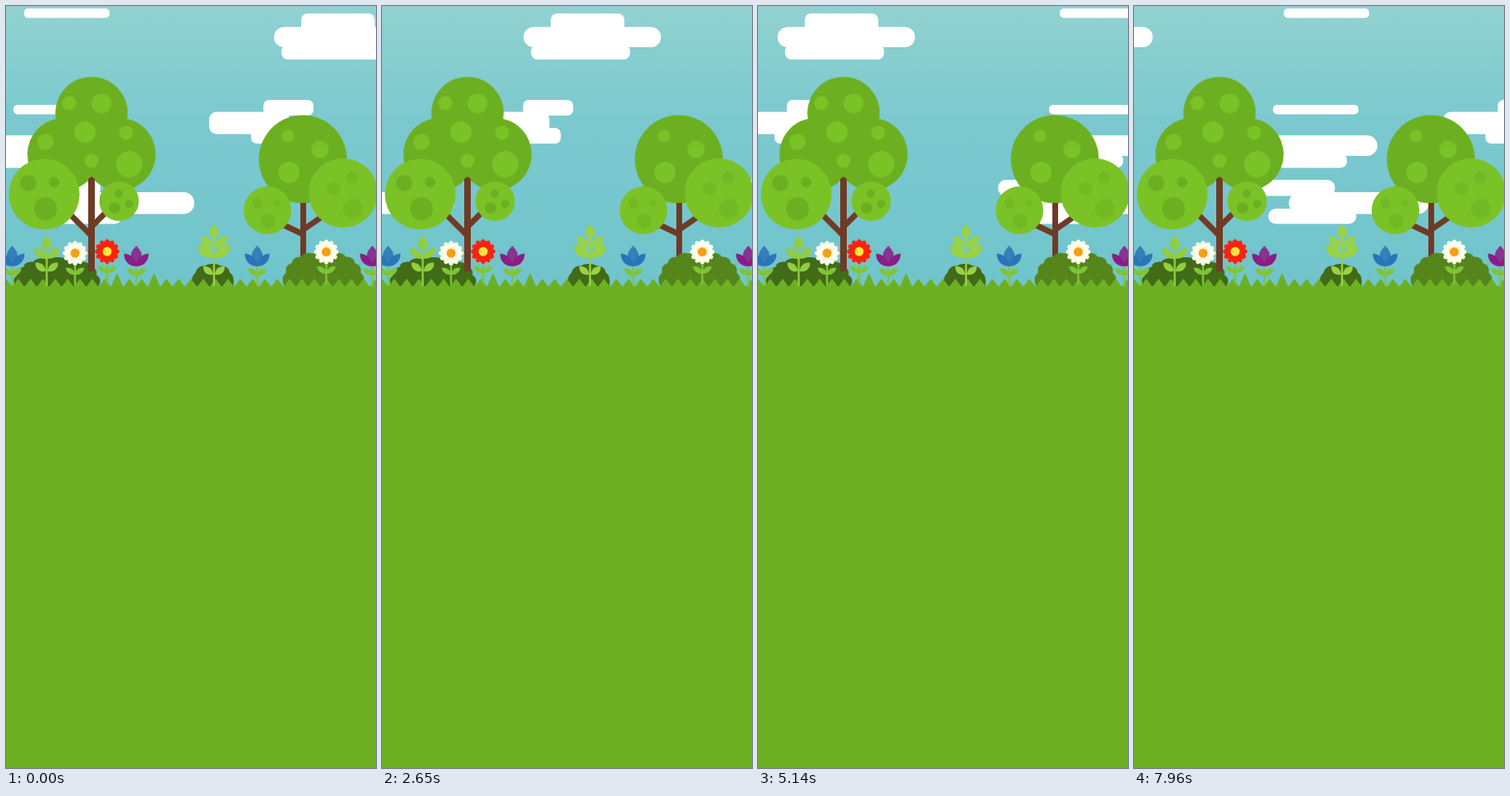
An HTML page that plays this animation: 450x925 px, repeating every 7990 ms.

```html
<!DOCTYPE html>
<html lang="en">
<head>
<meta charset="utf-8">
<title>Meadow with drifting clouds</title>
<style>
  html, body { margin: 0; width: 100%; height: 100%; overflow: hidden; background: #6cb021; }
  svg { display: block; width: 100%; height: 100%; }
</style>
</head>
<body>
<svg viewBox="0 0 450 925">
  <defs>
    <linearGradient id="sky" x1="0" y1="0" x2="0" y2="1">
      <stop offset="0" stop-color="#91d2d0"/>
      <stop offset=".4" stop-color="#7bc9cf"/>
      <stop offset="1" stop-color="#70c4cb"/>
    </linearGradient>

    <g id="streaks">
      <rect x="22" y="3" width="104" height="11.5" rx="5"/>
      <rect x="9" y="120" width="104" height="11.5" rx="5"/>
      <rect x="-31" y="157" width="167" height="25" rx="12.5"/>
      <rect x="-21" y="179" width="120" height="17.5" rx="8"/>
    </g>
    <g id="bigCloud">
      <rect x="359" y="9" width="89.5" height="26" rx="8"/>
      <rect x="326" y="25.5" width="167" height="24.5" rx="12"/>
      <rect x="335" y="47" width="120.5" height="18" rx="8"/>
    </g>
    <g id="lowClouds">
      <rect x="313" y="114" width="61" height="19" rx="7"/>
      <rect x="247" y="128.5" width="98" height="27" rx="9"/>
      <rect x="298" y="148" width="61" height="19" rx="7"/>
      <rect x="8" y="211" width="107" height="19.5" rx="9"/>
      <rect x="59" y="226" width="170" height="26.5" rx="13"/>
      <rect x="34" y="246" width="107" height="18.5" rx="9"/>
    </g>

    <path id="leaf" d="M0 0C1-8 6-12 14-12C15-4 9 2 0 0Z"/>
    <g id="sprout" fill="#80c436">
      <path d="M-1.2 0h2.4v24h-2.4z"/>
      <path d="M0 11C-1 4-6 2-11.5 3C-10 9-5 12 0 11ZM0 11C1 4 6 2 11.5 3C10 9 5 12 0 11Z"/>
    </g>
    <g id="tulip">
      <use href="#sprout" y="316"/>
      <path d="M0 291C5 296 8 301 6 307L0 314L-6 307C-8 301-5 296 0 291Z" fill-opacity=".86"/>
      <path d="M-15 300.500C-7 301-1 307 0 313C1 307 7 301 15 300.500C15 310 9 316 0 316C-9 316-15 310-15 300.500Z"/>
    </g>
  </defs>

  <rect width="450" height="345" fill="url(#sky)"/>

  <g fill="#fff">
    <g id="nearLayer"><use href="#streaks"/><use href="#bigCloud"/></g>
    <g id="fastLayer"><use href="#streaks"/></g>
    <g id="slowLayer"><use href="#lowClouds"/><use href="#lowClouds" x="562"/></g>
  </g>

  <g id="scene"></g>
</svg>

<script>
const GREEN = '#6cb021', LIGHT = '#7bc227', BARK = '#6f3b26', DARK = '#416b17';
const scene = document.getElementById('scene');
const add = markup => scene.insertAdjacentHTML('beforeend', markup);

const circles = (fill, ...list) =>
  add(list.map(([x, y, r]) => `<circle cx="${x}" cy="${y}" r="${r}" fill="${fill}"/>`).join(''));

const wood = (path, width) =>
  add(`<path d="${path}" fill="none" stroke="${BARK}" stroke-width="${width}"/>`);

// Half a rounded box with a scalloped rim.
function bush(x, rx, ry, lumps, fill) {
  const points = [];
  for (let i = 0; i <= 120; i++) {
    const a = Math.PI * i / 120, c = Math.cos(a), s = Math.sin(a);
    const k = 0.95 + 0.05 * Math.abs(Math.sin(lumps * a));
    points.push([
      x + rx * k * Math.sign(c) * Math.abs(c) ** 0.8,
      341 - ry * k * s ** 0.8
    ].map(v => v.toFixed(1)));
  }
  add(`<path d="M${points.join('L')}Z" fill="${fill}"/>`);
}

function daisy(x, y, petal, heart, heartRadius) {
  add(`<use href="#sprout" x="${x}" y="${y + 15}"/>`);
  let petals = '';
  for (let a = 0; a < 360; a += 30)
    petals += `<ellipse cy="-9.500" rx="3.500" ry="5.500" transform="rotate(${a})"/>`;
  add(`<g transform="translate(${x} ${y})" fill="${petal}"><circle r="9.500"/>${petals}
    <circle r="${heartRadius}" fill="${heart}"/></g>`);
}

function tulip(x, fill) {
  add(`<use href="#tulip" x="${x}" fill="${fill}"/>`);
}

function plant(x, top, fill, pairs) {
  const leaves = pairs.map(([y, size]) => [1, -1].map(side =>
    `<use href="#leaf" transform="translate(${side} ${y}) scale(${side * size} ${size})"/>`).join('')).join('');
  add(`<g fill="${fill}" transform="translate(${x} ${top})">
    <path d="M0 0C4 4 6 8 6 11C5 15 2 16 0 17C-2 16-5 15-6 11C-6 8-4 4 0 0Z"/>
    <path d="M-1.200 14h2.400V${340 - top}h-2.400z"/>${leaves}</g>`);
}

function grass() {
  let d = 'M0 345V332';
  for (let x = 0; x <= 450; x += 15)
    d += `L${x} ${x === 135 || x === 180 ? 324 : 331}L${x + 7.5} 341`;
  add(`<path d="${d}V345Z" fill="${GREEN}"/><rect y="340" width="450" height="585" fill="${GREEN}"/>`);
}

// Left tree
bush(62, 53, 36, 9, DARK);
circles(GREEN, [104, 130, 44], [70, 180, 44], [138, 180, 44], [104, 170, 30]);
circles(LIGHT, [77, 118, 8.5], [116, 118.5, 12], [96, 153, 13], [48, 165, 10],
  [146, 154, 8.5], [104, 188, 8.5], [150, 192, 16]);
wood('M76 251L104 279M124 248L104 268', 7);
add(`<path d="M100 322V210L104 207L108 210V322Z" fill="${BARK}"/>`);
circles(LIGHT, [46.5, 228.5, 43], [137.5, 237, 24]);
circles(GREEN, [27, 215, 10], [58.5, 214, 6.5], [48, 246, 14],
  [137, 228, 5], [132, 245, 7], [150, 240, 5]);

// Right tree
circles(GREEN, [361, 186, 53.5]);
circles(LIGHT, [343, 158, 7.5], [382, 174, 10.5], [344, 202, 13]);
wood('M336 265L361 277M384 256L361 272', 7);
wood('M361.500 239V320', 7);
circles(LIGHT, [410, 227, 42], [318, 248, 29]);
circles('#72b924', [398, 222, 8], [421, 208, 8], [422, 246, 12],
  [306, 239, 6], [329, 239, 4.5], [319, 261, 9]);

bush(386, 50, 43, 9, '#56861b');
bush(251.5, 26, 28, 5, DARK);
grass();

plant(49.5, 279, '#92cd3f', [[27, 1], [43, 0.9]]);
plant(253, 265, '#9ad245', [[27, 1.05], [40, 1.3], [61, 0.85]]);
tulip(7.5, '#2b74b8');
tulip(158.5, '#8c1c87');
tulip(305.5, '#2b74b8');
tulip(445.5, '#8c1c87');
daisy(84, 300, '#fffde9', '#ff9d13', 5.5);
daisy(123, 298, '#fb2310', '#ffe835', 5.5);
daisy(389.5, 298.5, '#fffde9', '#ff9d13', 5.5);

const LOOP = 7990, FIRST_HOLD = 100, STEP = 30;
const layers = [
  { id: 'nearLayer', start: 0, speed: 1.788 },
  { id: 'fastLayer', start: 677.6, speed: 1.968 },
  { id: 'slowLayer', start: 0, speed: 1.645 }
].map(layer => ({ ...layer, node: document.getElementById(layer.id) }));

const began = performance.now();
function draw() {
  const time = (performance.now() - began) % LOOP;
  const tick = time < FIRST_HOLD ? 0 : Math.floor((time - FIRST_HOLD) / STEP) + 1;
  for (const { node, start, speed } of layers)
    node.setAttribute('transform', `translate(${(start - speed * tick).toFixed(2)} 0)`);
  requestAnimationFrame(draw);
}
draw();
</script>
</body>
</html>
```
